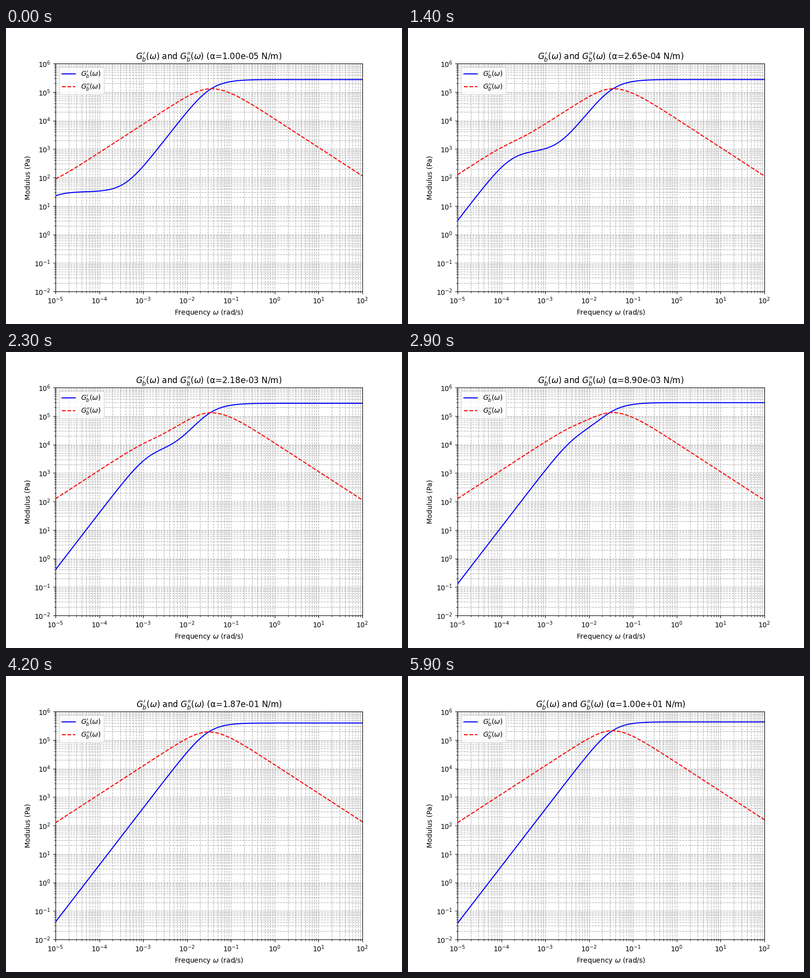
A matplotlib script that plays this animation: 800x600 px, repeating every 6 s.

```python
import numpy as np
import matplotlib.pyplot as plt
from matplotlib.animation import FuncAnimation

FRAMES = 60
INTERVAL = 100  # ms

PHI = 0.2       # droplet volume fraction
RADIUS = 1e-7   # droplet radius, m

omega = np.logspace(-5, 2, 500)
tensions = np.logspace(-5, 1, FRAMES)


def maxwell(eta, tau):
    """Complex modulus of a single-mode Maxwell fluid."""
    return 1j * omega * eta / (1 + 1j * omega * tau)


def palierne(gm, gd, alpha):
    """Complex modulus of an emulsion with interfacial tension alpha."""
    s = alpha / RADIUS
    mix = 16 * gm + 19 * gd
    num = 4 * s * (2 * gm + 5 * gd) + (gd - gm) * mix
    den = 40 * s * (gm + gd) + (2 * gd + 3 * gm) * mix
    h = num / den
    return gm * (1 + 3 * PHI * h) / (1 - 2 * PHI * h)


g_matrix = maxwell(1e7, 30)
g_drop = maxwell(1e6, 10)

fig, ax = plt.subplots(figsize=(8, 6), dpi=100)
storage, = ax.loglog([], [], "b-", label=r"$G_b'(\omega)$")
loss, = ax.loglog([], [], "r--", label=r"$G_b''(\omega)$")
ax.set_xlim(1e-5, 1e2)
ax.set_ylim(1e-2, 1e6)
ax.set_xlabel(r"Frequency $\omega$ (rad/s)")
ax.set_ylabel("Modulus (Pa)")
ax.grid(True, which="both", ls="--")
ax.legend(loc="upper left")


def update(i):
    alpha = tensions[i]
    g = palierne(g_matrix, g_drop, alpha)
    storage.set_data(omega, g.real)
    loss.set_data(omega, g.imag)
    ax.set_title(rf"$G_b'(\omega)$ and $G_b''(\omega)$ (α={alpha:.2e} N/m)")
    return storage, loss


anim = FuncAnimation(fig, update, frames=FRAMES, interval=INTERVAL,
                     repeat=True, repeat_delay=0, blit=False)
plt.show()
```
